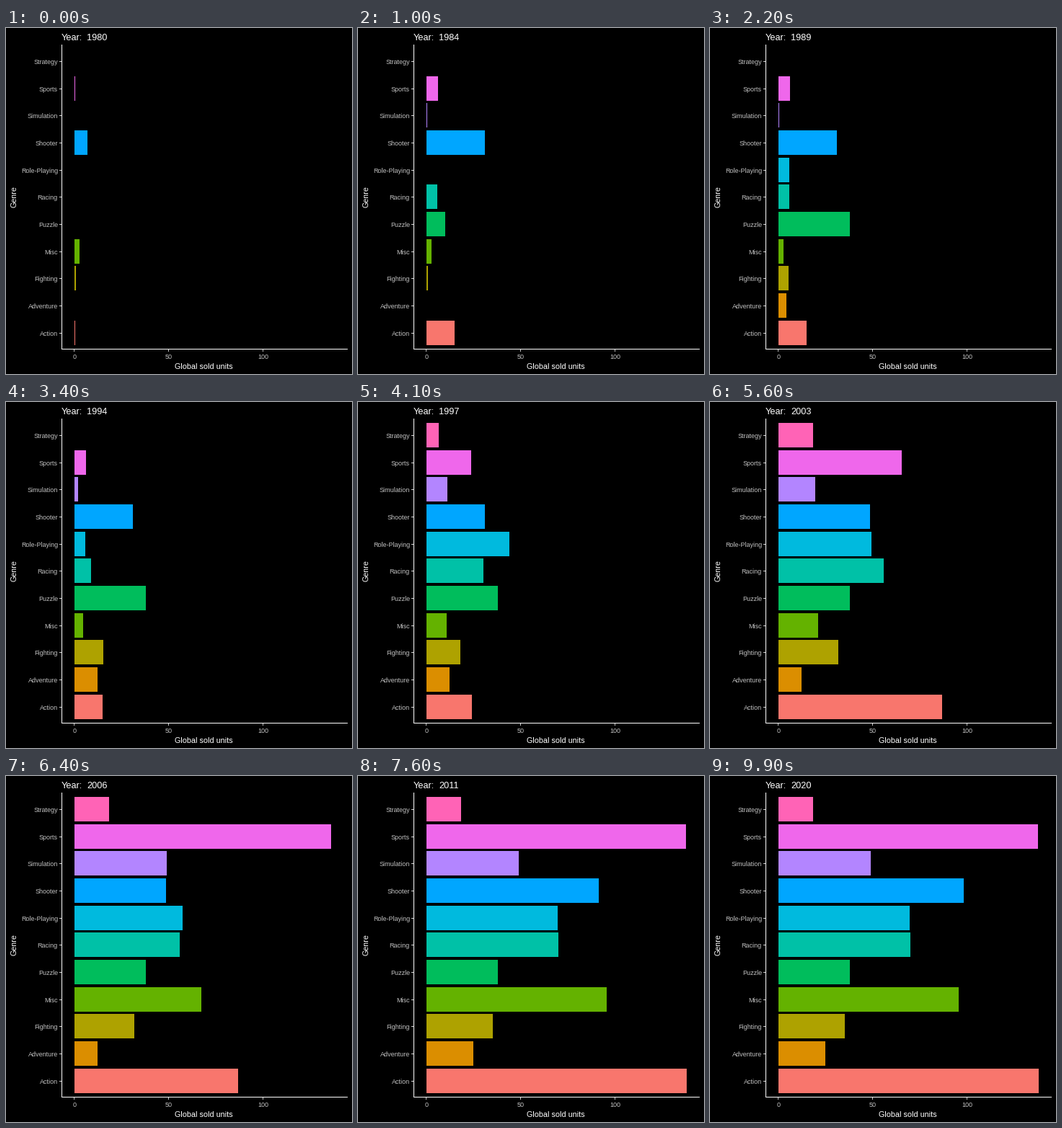
Animation of 480 by 480 pixels, one loop 10000 ms. Source, as a matplotlib script:

```python
import matplotlib.pyplot as plt
from matplotlib.animation import FuncAnimation
from matplotlib.patches import Rectangle

SIZE, FRAMES, INTERVAL = 480, 100, 100
FIRST_YEAR, LAST_YEAR = 1980, 2020
ZERO_X, UNIT = 94.7, 2.62            # pixel of value 0, pixels per unit
BAR_LEFT, BAR_TOP, BAR_STEP, BAR_HEIGHT = 95, 29, 37.68, 34
DIP = 0.75                           # share of a record that sales fall back to
LABEL_GREY, TICK_GREY = "#c0c0c0", "#cccccc"

plt.rcParams["font.family"] = "Liberation Sans"

fig = plt.figure(figsize=(SIZE / 72, SIZE / 72), dpi=72, facecolor="black")
ax = fig.add_axes([0, 0, 1, 1])
ax.set(xlim=(0, SIZE), ylim=(SIZE, 0))
ax.axis("off")


def box(x, y, w, h, color):
    return ax.add_patch(Rectangle((x, y), w, h, fc=color, lw=0, aa=False))


def label(x, y, text, size, color="white", ha="left", **kw):
    return ax.text(x, y, text, size=size, color=color, ha=ha, va="baseline", **kw)


def key_frame(year):
    return int((year - FIRST_YEAR) * (FRAMES - 1) / (LAST_YEAR - FIRST_YEAR) + 0.49)


def record_at(records, frame):
    """Best sales so far: each record is climbed to during the year before it."""
    years = list(records)
    best = records[years[0]] if frame >= key_frame(years[0]) else 0
    for last, year in zip(years, years[1:]):
        start, end = key_frame(year - 1), key_frame(year)
        if frame < start:
            break
        low = records[last] * (1 if last == year - 1 else DIP)
        t = min(1, (frame - start) / (end - start))
        best = max(best, low + t * (records[year] - low))
    return best


class Genre:
    def __init__(self, row, name, color, records):
        self.records = records
        top = round(BAR_TOP + BAR_STEP * row)
        self.bar = box(BAR_LEFT, top, 0, BAR_HEIGHT, color)
        label(72, round(top + 21.4), name, 9, LABEL_GREY, "right")
        box(74, top + 17, 3, 1, TICK_GREY)

    def update(self, frame):
        value = record_at(self.records, frame)
        width = max(1, round(ZERO_X + UNIT * value) - BAR_LEFT) if value else 0
        self.bar.set_width(width)


# Record years of each genre, top row first.
genres = [Genre(row, *spec) for row, spec in enumerate([
    ("Strategy", "#FF63B6", {1994: 3.6, 1995: 6.5, 1998: 13.5, 1999: 18.4}),
    ("Sports", "#EF67EB", {1980: .5, 1984: 6.2, 1996: 17.4, 1997: 30, 1998: 41.8,
                           2002: 65.4, 2006: 136, 2009: 137.5}),
    ("Simulation", "#B385FF", {1981: .4, 1991: 2.1, 1996: 11.3, 2001: 19.5, 2005: 49}),
    ("Shooter", "#00A6FF", {1980: 7.1, 1984: 31.1, 2002: 48.6, 2007: 70.8,
                            2010: 77.4, 2011: 98.1}),
    ("Role-Playing", "#00BADE", {1986: 2.5, 1988: 5.9, 1995: 14.3, 1996: 44,
                                 1999: 49.3, 2006: 57.3, 2010: 69.5}),
    ("Racing", "#00C1A7", {1984: 5.9, 1992: 9, 1996: 28.4, 1997: 31.9,
                           2001: 55.9, 2008: 69.8}),
    ("Puzzle", "#00BD5C", {1982: 10, 1989: 37.8}),
    ("Misc", "#64B200", {1980: 2.7, 1990: 4.8, 1996: 10.7, 1999: 21,
                         2005: 67.2, 2007: 91.5, 2010: 95.4}),
    ("Fighting", "#AEA200", {1980: .8, 1987: 5.4, 1992: 15.2, 1996: 18,
                             1998: 31.7, 2008: 35.2}),
    ("Adventure", "#DB8E00", {1987: 4.4, 1992: 12.2, 2007: 24.9}),
    ("Action", "#F8766D", {1980: .3, 1981: 14.9, 1996: 20.6, 1997: 27.6, 1998: 39.4,
                           2002: 86.8, 2007: 106.5, 2008: 137.9}),
])]

# Axes
box(77, 23, 1, 423, "white")
box(77, 445, 397, 1, "white")
for tick in (0, 50, 100):
    x = ZERO_X + UNIT * tick
    box(int(x), 446, 1, 3, TICK_GREY)
    label(x, 459, str(tick), 9, LABEL_GREY, "center")
label(274.5, 473, "Global sold units", 10.7, ha="center")
label(15, 234.5, "Genre", 10.7, ha="center", rotation=90, rotation_mode="anchor")

label(77, 17, "Year:", 12.8)
year_text = label(112, 17, "", 12.8)


def draw(frame):
    span = LAST_YEAR - FIRST_YEAR
    year_text.set_text(str(round(FIRST_YEAR + frame * span / (FRAMES - 1))))
    for genre in genres:
        genre.update(frame)
    return [year_text] + [genre.bar for genre in genres]


anim = FuncAnimation(fig, draw, frames=FRAMES, interval=INTERVAL,
                     repeat=True, repeat_delay=0)
plt.show()
```
